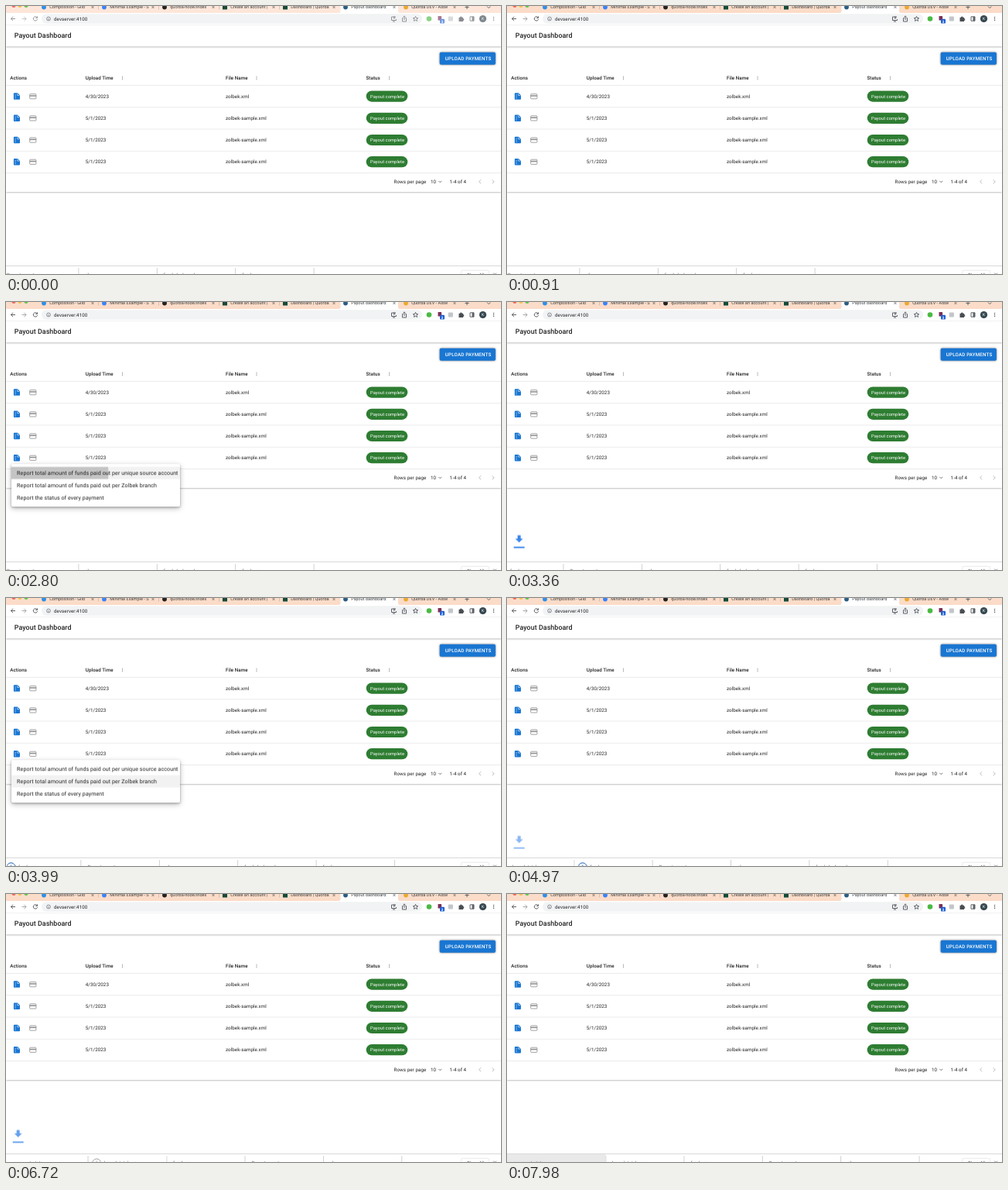
An HTML page for the animation above (8 s loop, 640 by 346 pixels).

```html
<!DOCTYPE html>
<html lang="en">
<head>
<meta charset="utf-8">
<title>Payout Dashboard</title>
<style>
  html, body { margin: 0; width: 100%; height: 100%; overflow: hidden; background: #fff; }
  #stage { display: block; width: 640px; height: 346px; }
  text { font-family: Roboto, Arial, sans-serif; text-rendering: geometricPrecision; white-space: pre; }
  .bar { filter: drop-shadow(0 .8px .8px rgba(0,0,0,.32)) drop-shadow(0 .6px 1.8px rgba(0,0,0,.22)); }
  .paper { filter: drop-shadow(0 1px 1px rgba(0,0,0,.3)) drop-shadow(0 2px 3.5px rgba(0,0,0,.26)); }
  .line { fill: none; stroke: #5f6368; stroke-width: 1; }
</style>
</head>
<body>
<svg id="stage" viewBox="0 0 640 346"></svg>
<script>
const LOOP = 8000;
const STANDARD = 'cubic-bezier(.4,0,.2,1)';
const QUAD_OUT = 'cubic-bezier(.333,.667,.667,1)';
const QUAD_IN = 'cubic-bezier(.333,0,.667,.333)';
const BLUE = '#1976d2';
const ACTIVE_AT = 600;

const visits = [
  { open: 1540, row: 0, hover: 1960, click: 2625, close: 2860 },
  { open: 3600, row: 1, hover: 3800, click: 4270, close: 4380 },
  { open: 5300, row: 2, hover: 5500, click: 6050, close: 6170 },
];
// Newest first; the shelf keeps five entries.
const downloads = [
  { id: 'c', at: 6250, width: 126, label: 'payment-stats' },
  { id: 'b', at: 4460, width: 101.4, label: 'branch-totals.csv', icon: [5300, 7300], ring: '#9aa0a6' },
  { id: 'a', at: 2950, width: 101.4, label: 'funds.csv', icon: [3500, 5350], ring: '#1a5fb4' },
];
const olderFiles = ['Payout-report', 'ab', 'funds-by-branch', 'funds.csv'];

// Drawing helpers
const text = (x, y, str, size = 6.22, { fill = '#212121', weight = 400, spacing = .01, extra = '' } = {}) =>
  `<text x="${x}" y="${y}" font-size="${size}" fill="${fill}" font-weight="${weight}" letter-spacing="${spacing}em" ${extra}>${str}</text>`;
const rect = (x, y, w, h, fill, extra = '') =>
  `<rect x="${x}" y="${y}" width="${w}" height="${h}" fill="${fill}" ${extra}/>`;
const circle = (x, y, r, fill, extra = '') => `<circle cx="${x}" cy="${y}" r="${r}" fill="${fill}" ${extra}/>`;
const path = (d, extra = 'class="line"') => `<path d="${d}" ${extra}/>`;
const dots = (x, y, gap, r, fill) => [-1, 0, 1].map(i => circle(x, y + i * gap, r, fill)).join('');
const cross = (x, y, r = 1.5) => path(`M${x - r} ${y - r}l${2 * r} ${2 * r}m0 ${-2 * r}l${-2 * r} ${2 * r}`, 'stroke="#555" stroke-width=".7"');

function tabStrip() {
  const tabs = [
    ['Composition - Gild', '#2f8fe8'], ['Minimal Example - S', '#3b82f6'],
    ['quorba-node/index', '#222'], ['Create an account |', '#124a3a'],
    ['Dashboard | Quorba', '#124a3a'], ['Payout dashboard', '#2a5d84'],
    ['Quorba DEV - Asse', '#eda92f'],
  ];
  const lights = ['#ee6a5f', '#f5bd4f', '#61c454'].map((c, i) => circle(10 + 8 * i, -.6, 2.6, c)).join('');
  return rect(0, 0, 640, 9, '#fbdcc8')
    + rect(0, 0, 640, 9, '#fde6d9', 'id="idle"') + lights
    + path('M430 9q2.500 0 2.500-2.500V0H507v6.500q0 2.500 2.500 2.500z', 'fill="#fff"')
    + tabs.map(([label, color], i) => {
      const x = 49 + 78 * i;
      const mark = i === 3 || i === 4 ? rect(x - 3, -1.5, 6, 6, color) : circle(x, 1.5, 2.9, color);
      const edge = i < 4 ? rect(x + 70, 0, .6, 4.5, '#c5aa9b') : '';
      return mark + text(x + 7.2, 3.3, label, 5.6, { fill: '#3c4043', spacing: 0 }) + cross(x + 63, 1.5) + edge;
    }).join('')
    + path('M593.500 1.500h5M596 -1v5M622 .5l2.200 2.200 2.200-2.200');
}

function toolbar() {
  const nav = path('M12 16.500H6.500m2.600-2.700l-2.700 2.700 2.700 2.700') 
    + path('M20.500 16.500H26m-2.600-2.700l2.700 2.700-2.700 2.700', 'class="line" opacity=".55"')
    + path('M40 14.600a2.700 2.700 0 1 0 .6 2.500M40.600 13.300v2.200h-2.200');
  const pageIcons = path('M504 14h-5.500v4.500h6v-1.500M500 20h3M502 13v3.200m-1.300-1.200l1.300 1.300 1.300-1.300', 'class="line" stroke-width=".8"')
    + path('M513.500 15.500h-1v4.500h5v-4.500h-1M515 18v-5m-1.500 1.300l1.500-1.500 1.500 1.500', 'class="line" stroke-width=".8"')
    + path('M529.500 13.300l.9 2.100 2.300.2-1.700 1.500.5 2.300-2-1.200-2 1.200.5-2.300-1.700-1.500 2.300-.2z', 'class="line" stroke-width=".7"');
  const extras = circle(547, 16.5, 3.3, '#4bb944')
    + rect(558.5, 13, 4.6, 5.5, '#7a3158', 'rx=".6"') + rect(561, 16.8, 6, 5.8, '#1f5fd0', 'rx="1"')
    + text(562.7, 21.6, '2', 4.6, { fill: '#fff', weight: 700 })
    + rect(571.7, 13.5, 6.2, 6, '#c3c6c9', 'rx="1"')
    + path('M585.500 14.700h1.600a1.200 1.200 0 1 1 2.400 0h1.600v1.600a1.200 1.200 0 1 1 0 2.400v1.300h-5.600z', 'fill="#4a4e52"')
    + path('M600 13.800h5v5.400h-5z') + rect(602.5, 13.8, 2.5, 5.4, '#5f6368')
    + circle(616.5, 16.5, 4.6, '#37474f') + text(614.9, 18.4, 'K', 5, { fill: '#fff' })
    + dots(630.5, 16.5, 2.1, .75, '#5f6368');
  return rect(0, 9, 640, 15, '#fff') + rect(46, 10.3, 492, 12.4, '#f1f3f4', 'rx="6.2"')
    + circle(55, 16.5, 2.4, 'none', 'stroke="#5f6368" stroke-width=".7"') + rect(54.65, 16, .7, 1.9, '#5f6368')
    + text(62, 18.7, 'devserver:4100', 6.2, { fill: '#202124', spacing: .015 })
    + `<g id="tools">${nav}${pageIcons}${extras}</g>`;
}

function actionIcons(y) {
  const page = path(`M10.800 ${y - 4.300}h4.200l3 3v4.600q0 .9-.9.900h-6.300q-.9 0-.9-.9v-6.700q0-.9.9-.9z`, `fill="${BLUE}"`)
    + [-1.8, .2, 2.2].map(d => rect(11.6, y + d - .4, .9, .9, '#fff')).join('')
    + path(`M14.800 ${y - 3.600}v2.500h2.500`, 'fill="none" stroke="#fff" stroke-width=".6"');
  const card = rect(30.7, y - 3, 8.2, 6.2, '#fff', 'rx=".7" stroke="#8c8c8c" stroke-width=".8"')
    + rect(30.7, y - 1.4, 8.2, 1.5, '#8c8c8c');
  return page + card;
}

function table() {
  const heads = [[5.3, 'Actions'], [102.8, 'Upload Time', 150.5], [284, 'File Name', 324], [465.5, 'Status', 495.5]];
  const rows = ['4/30/2023', '5/1/2023', '5/1/2023', '5/1/2023'];
  const head = heads.map(([x, label, menuX]) => text(x, 95, label, 6.22, { weight: 500 })
    + (menuX ? dots(menuX, 93, 1.8, .55, '#777') : '')).join('');
  const body = rows.map((date, i) => {
    const y = 116.6 + 28.2 * i;
    return actionIcons(y) + text(102.8, y + 2.1, date)
      + text(284, y + 2.1, i ? 'zolbek-sample.xml' : 'zolbek.xml')
      + rect(465.7, y - 7.1, 53.6, 14.2, '#2e7d32', 'rx="7.1"')
      + text(471, y + 2, 'Payout complete', 5.78, { fill: '#fff' })
      + rect(0, y + 13.9, 640, .6, '#dedede');
  }).join('');
  const footer = text(501.6, 229, 'Rows per page') + text(549, 229, '10') + text(573.6, 229, '1-4 of 4')
    + path('M559.300 225.800l1.900 1.900 1.900-1.900', 'fill="none" stroke="#666" stroke-width=".9"')
    + path('M614 224.300l-2.300 2.500 2.300 2.500M628.800 224.300l2.300 2.500-2.300 2.500', 'fill="none" stroke="#aaa" stroke-width=".8"');
  return rect(0, 45, 640, 195, '#fff', 'class="bar"')
    + rect(0, 24, 640, 28.3, '#fff', 'class="bar"') + rect(0, 23.8, 640, .6, '#dcdcdc')
    + text(10.7, 41.4, 'Payout Dashboard', 8.89, { weight: 500, spacing: .0075 })
    + rect(560.7, 59.7, 72.2, 16, BLUE, 'rx="1.8" class="bar"')
    + text(567.8, 70, 'UPLOAD PAYMENTS', 6.22, { fill: '#fff', weight: 500, spacing: .0286 })
    + head + rect(0, 102.3, 640, .6, '#dedede') + body + footer;
}

function menu() {
  const labels = ['Report total amount of funds paid out per unique source account',
    'Report total amount of funds paid out per Zolbek branch', 'Report the status of every payment'];
  const states = visits.map(({ row }) => `<svg y="${3.6 + 16 * row}" width="218" height="16">
    ${rect(0, 0, 218, 16, '#000', `id="hover${row}" opacity="0"`)}
    ${circle(58, 8, 0, '#000', `id="ripple${row}" opacity="0"`)}</svg>`).join('');
  return `<g transform="translate(7 209.2)"><g id="menu" opacity="0">
    ${rect(0, 0, 218, 55.1, '#fff', 'rx="1.8" class="paper"')}${states}
    ${labels.map((label, i) => text(7.1, 14.1 + 16 * i, label, 7.11, { spacing: .0094 })).join('')}
  </g></g>`;
}

function shelf() {
  const label = (x, str, extra) => text(x, 349, str, 5.8, { fill: '#5f6368', extra });
  const divider = x => rect(x - .4, 338, .8, 8, '#c4c7ca');
  let content = olderFiles.map((name, i) =>
    `<g id="old${i}">${label(101.4 * i + 8.5, name)}${divider(101.4 * (i + 1))}</g>`).join('');
  // Each newer entry slides everything older to the right.
  for (const { id, label: name, ring } of [...downloads].reverse()) {
    const icon = ring ? `<g id="icon-${id}" opacity="0">${circle(11, 347.300, 5.4, '#fff', `stroke="${ring}" stroke-width="1"`)}
      ${rect(10.5, 344.5, 1, 4, ring)}</g>` : rect(-2, 336, 130, 10, '#e9e9e9', 'id="shelfHover" opacity="0"');
    content = `${icon}${label(8.5, name, `id="label-${id}"`)}
      <g id="push-${id}">${rect(0, 336, 660, 10, '#fff')}${divider(0)}${content}</g>`;
  }
  return rect(0, 335, 640, 11, '#fff') + `<g transform="translate(1.5 0)">${content}</g>`
    + rect(588.5, 341.3, 36, 12, '#fff', 'rx="2" stroke="#dadce0" stroke-width=".6"')
    + text(596, 349, 'Show All', 5.6, { fill: '#3c4043' }) + cross(632, 346.5, 1.8)
    + rect(0, 335, 640, .7, '#c9c9c9');
}

const arrow = `<g id="arrow" opacity="0" fill="#1a73e8">
  <path d="M13.700 312.500h4v4.200h3l-5 5-5-5h3z"/>${rect(8.7, 327.2, 14, 1.9, '#1a73e8')}</g>`;

const stage = document.getElementById('stage');
stage.innerHTML = rect(0, 0, 640, 346, '#fff') + table() + tabStrip() + toolbar() + menu() + arrow + shelf();

// Motion helpers: steps are [ms, properties, easing to the next step]
function play(id, steps) {
  const all = [[0, steps[0][1]], ...steps, [LOOP, steps.at(-1)[1]]];
  document.getElementById(id).animate(
    all.map(([ms, props, easing = 'linear']) => ({ offset: ms / LOOP, easing, ...props })),
    { duration: LOOP, iterations: Infinity });
}
const swap = (id, ms, before, after) => play(id, [[ms, before], [ms, after]]);
const pulse = (id, from, to, off, on) => play(id, [[from, off], [from, on], [to, on], [to, off]]);
const clear = { opacity: 0 }, solid = { opacity: 1 };
const shift = (x, y = 0) => ({ transform: `translate(${x}px, ${y}px)` });
const scale = s => ({ transform: `scale(${s}, ${s * s})` });

swap('idle', ACTIVE_AT, solid, clear);
swap('tools', ACTIVE_AT, { opacity: .65 }, solid);

play('menu', visits.flatMap(({ open, close }) => [
  [open, clear, STANDARD], [open + 251, solid], [close, solid, STANDARD], [close + 251, clear]]));
play('menu', visits.flatMap(({ open, close }) => [
  [open, scale(.75), STANDARD], [open + 115, scale(1)], [close + 84, scale(1), STANDARD], [close + 251, scale(.75)]]));

for (const { row, hover, click, close } of visits) {
  pulse(`hover${row}`, hover, close + 251, clear, { opacity: .05 });
  pulse(`ripple${row}`, click, close + 251, clear, { opacity: .19 });
  play(`ripple${row}`, [[click, { r: '0px' }, STANDARD], [click + 550, { r: '160px' }]]);
}

for (const { id, at, width, icon } of downloads) {
  play(`push-${id}`, [[at, shift(-3)], [at, shift(0), QUAD_OUT], [at + 800, shift(width)]]);
  if (!icon) continue;
  pulse(`icon-${id}`, ...icon, clear, solid);
  pulse(`label-${id}`, ...icon, shift(0), shift(12));
}
swap('old3', downloads[1].at, solid, clear);
swap('old2', downloads[0].at, solid, clear);
swap('shelfHover', 7700, clear, solid);

const starts = downloads.map(d => d.at).reverse();
play('arrow', starts.flatMap(at => [[at, clear, QUAD_OUT], [at + 300, solid, QUAD_IN], [at + 600, clear]]));
play('arrow', starts.flatMap(at => [[at, shift(0, -36)], [at + 600, shift(0, 0)], [at + 600, shift(0, -36)]]));
</script>
</body>
</html>
```
